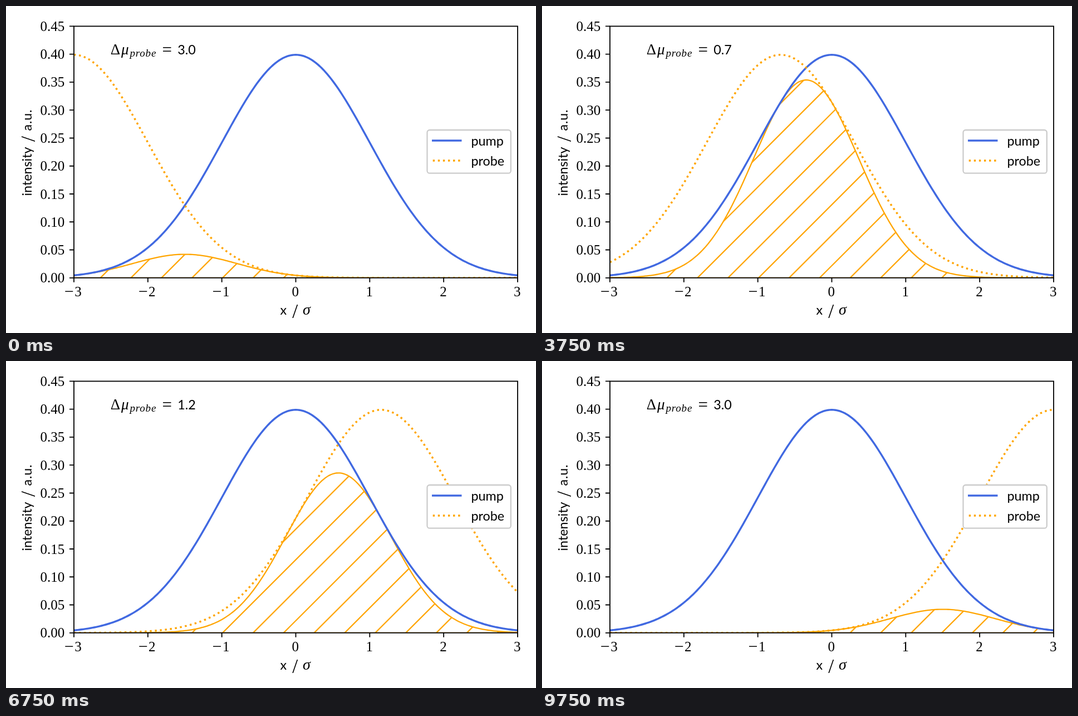
An HTML page that plays this animation: 952 by 588 pixels, repeating every 10 s.

```html
<!DOCTYPE html>
<html lang="en">
<head>
<meta charset="utf-8">
<title>Pump and probe overlap</title>
<style>
  html, body { margin: 0; width: 100%; height: 100%; overflow: hidden; background: #fff; }
  svg { display: block; width: 952px; height: 588px; }
  text { fill: #000; white-space: pre; }
  .serif { font: 25px "Liberation Serif", serif; }
  .math { font: italic 27px "Liberation Serif", serif; }
  .sans { font: 23.3px Lato, sans-serif; }
  .slash { font: 36px "Liberation Serif", serif; }
  .axis { fill: none; stroke: #000; stroke-width: 1.83; }
  .pump { fill: none; stroke: #4169e1; stroke-width: 3.43; stroke-linejoin: round; }
  .probe { fill: none; stroke: #ffa500; stroke-width: 3.43; stroke-dasharray: 3.43 5.66; }
  .area { fill: none; stroke: #ffa500; stroke-width: 2.29; }
</style>
</head>
<body>
<svg viewBox="0 0 952 588" xmlns="http://www.w3.org/2000/svg">
  <defs>
    <clipPath id="box"><rect x="122" y="36.4" width="797" height="452.4"/></clipPath>
    <clipPath id="under"><path id="underPath"/></clipPath>
  </defs>
  <rect width="952" height="588" fill="#fff"/>
  <g clip-path="url(#box)">
    <path id="hatch" class="area" clip-path="url(#under)"/>
    <path id="edge" class="area"/>
    <path id="pump" class="pump"/>
    <path id="probe" class="probe"/>
  </g>
  <path id="ticks" class="axis"/>
  <rect class="axis" x="122" y="36.4" width="797" height="452.4"/>
  <g id="labels" class="serif"></g>

  <text class="sans" x="492.5" y="555">x</text>
  <text class="slash" x="514.3" y="561">/</text>
  <text class="math" x="533" y="555" style="font-size:28px">σ</text>
  <g transform="translate(46 341.5) rotate(-90)">
    <text class="sans">intensity</text>
    <text class="slash" x="97.5" y="5.5">/</text>
    <text class="sans" x="117" letter-spacing=".8">a.u.</text>
  </g>

  <text class="serif" x="187.8" y="87" style="font-size:27px">Δ</text>
  <text class="math" x="207" y="87">μ</text>
  <text class="math" x="222.5" y="91" letter-spacing=".8" style="font-size:19px">probe</text>
  <text class="serif" x="280.5" y="88.8" style="font-size:31px">=</text>
  <text id="value" class="sans" x="308.3" y="87"></text>

  <rect x="756.5" y="223" width="150.3" height="77.7" rx="4.5" fill="#fff" stroke="#ccc" stroke-width="2.29"/>
  <path class="pump" d="M765 242H818.5"/>
  <path class="probe" d="M766.7 278H817"/>
  <text class="sans" x="835.5" y="250.8">pump</text>
  <text class="sans" x="835.5" y="286.6">probe</text>
</svg>
<script>
  const STEPS = 40, HOLD = 250, BASE = 488.8;
  const $ = id => document.getElementById(id);
  const draw = (id, d) => $(id).setAttribute('d', d);
  const px = x => 520.5 + x * 132.833;
  const py = y => BASE - y * 452.4 / 0.45;
  const gauss = x => Math.exp(-x * x / 2) / Math.sqrt(2 * Math.PI);

  function curve(f, n = 240) {
    const pts = [];
    for (let i = 0; i <= n; i++) {
      const x = -3 + 6 * i / n;
      pts.push(px(x).toFixed(2) + ' ' + py(f(x)).toFixed(2));
    }
    return 'M' + pts.join('L');
  }

  function label(text, x, y, anchor, size = 25) {
    const el = document.createElementNS('http://www.w3.org/2000/svg', 'text');
    el.setAttribute('x', x);
    el.setAttribute('y', y);
    el.setAttribute('text-anchor', anchor);
    el.style.fontSize = size + 'px';
    el.textContent = text;
    $('labels').append(el);
  }

  function buildAxes() {
    let d = '';
    for (let x = -3; x <= 3; x++) {
      const c = px(x);
      d += `M${c} ${BASE}v8`;
      if (x < 0) {
        label('−', c - 16.9, 523.3, 'start', 30);
        label(-x, c + 7.5, 522, 'middle');
      } else {
        label(x, c - 0.7, 522, 'middle');
      }
    }
    for (let i = 0; i <= 9; i++) {
      const y = py(i * 0.05);
      d += `M122 ${y}h-8`;
      label((i * 0.05).toFixed(2), 105.2, y + 8.5, 'end');
    }
    draw('ticks', d);
  }

  function buildHatch() {
    let d = '';
    for (let k = -9; k < 15; k++) d += `M${169.6 + 54.85 * k} ${BASE}l460 -460`;
    draw('hatch', d);
  }

  function render(time) {
    const step = Math.floor(time / HOLD) % STEPS;
    const mu = -3 + 6 * step / (STEPS - 1);
    const overlap = curve(x => gauss(x) * gauss(x - mu) / gauss(0));
    const closed = `${overlap}L919 ${BASE}L122 ${BASE}Z`;
    draw('underPath', closed);
    draw('edge', closed);
    draw('probe', curve(x => gauss(x - mu)));
    $('value').textContent = Math.abs(mu).toFixed(1);
  }

  function loop(now) {
    render(now);
    requestAnimationFrame(loop);
  }

  buildAxes();
  buildHatch();
  draw('pump', curve(gauss));
  render(0);
  requestAnimationFrame(loop);
</script>
</body>
</html>
```
